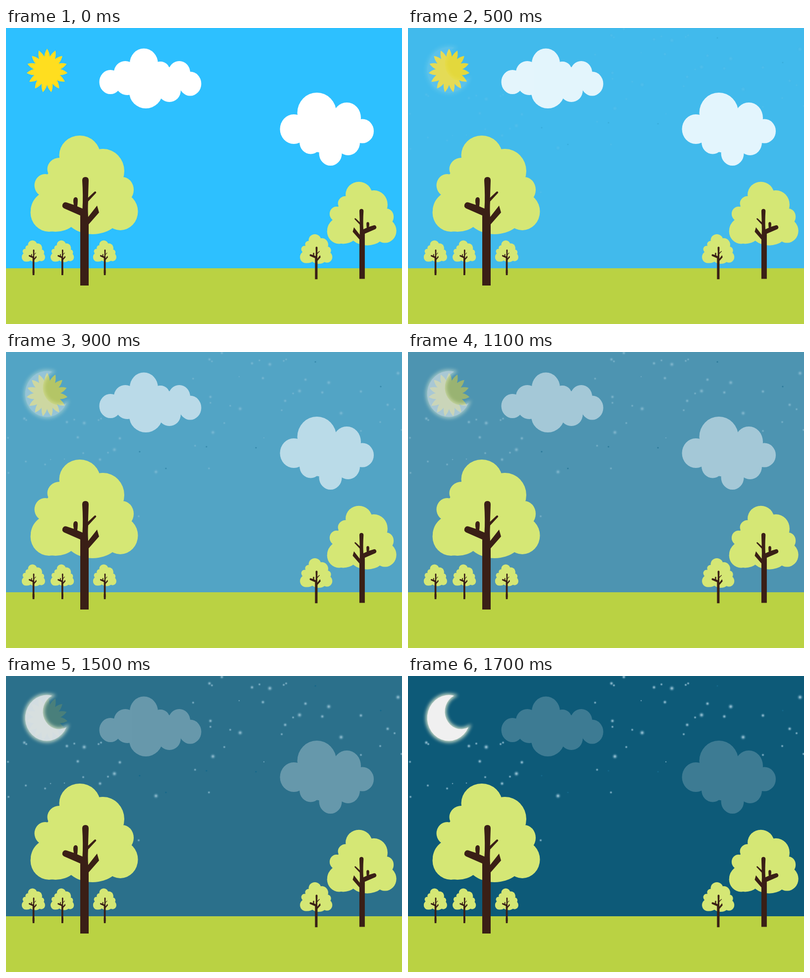
Animation of 800 by 600 pixels, one loop 2200 ms. Source, as an HTML page:

```html
<!DOCTYPE html>
<html lang="en">
<head>
<meta charset="utf-8">
<title>Day to night</title>
<style>
  html, body { margin: 0; width: 100%; height: 100%; overflow: hidden; background: #fff; }
  svg { display: block; width: 100vw; height: 100vh; }
  .day { animation: day 2200ms infinite; }
  .night { animation: night 2200ms infinite; }
  /* hold, then a crossfade in 14 steps of 100 ms, then hold */
  @keyframes day {
    0% { opacity: 1; }
    18.181% { opacity: 1; animation-timing-function: steps(14, jump-start); }
    81.815%, 100% { opacity: 0; }
  }
  @keyframes night {
    0% { opacity: 0; }
    18.181% { opacity: 0; animation-timing-function: steps(14, jump-start); }
    81.815%, 100% { opacity: 1; }
  }
</style>
</head>
<body>
<svg viewBox="0 0 800 600">
  <defs>
    <radialGradient id="glint">
      <stop offset="0" stop-color="#c4e2ee" stop-opacity=".8"/>
      <stop offset=".3" stop-color="#b4d8e8" stop-opacity=".6"/>
      <stop offset=".65" stop-color="#8cbfd6" stop-opacity=".2"/>
      <stop offset="1" stop-color="#8cbfd6" stop-opacity="0"/>
    </radialGradient>
    <filter id="blur" x="-40%" y="-40%" width="180%" height="180%">
      <feGaussianBlur stdDeviation="3.5"/>
    </filter>
    <path id="moon" d="M93 40A33 35.5 0 0 0 122 104A43.5 46.5 0 1 1 93 40Z"/>
    <g id="clouds">
      <ellipse cx="211" cy="109.5" rx="22.5" ry="24.5"/>
      <ellipse cx="241" cy="90" rx="23" ry="23"/>
      <ellipse cx="245" cy="112" rx="24" ry="24"/>
      <ellipse cx="278.5" cy="72" rx="28.5" ry="30.5"/>
      <ellipse cx="312" cy="87" rx="19" ry="19"/>
      <ellipse cx="350" cy="90" rx="22" ry="23"/>
      <ellipse cx="372" cy="113" rx="22.5" ry="24.5"/>
      <ellipse cx="330" cy="127" rx="23" ry="23"/>
      <ellipse cx="282.5" cy="130" rx="33.5" ry="33"/>
      <ellipse cx="290" cy="103" rx="75" ry="28"/>
      <ellipse cx="581.5" cy="205" rx="28" ry="30"/>
      <ellipse cx="628" cy="172" rx="39.5" ry="41"/>
      <ellipse cx="688.5" cy="182" rx="28.5" ry="31"/>
      <ellipse cx="720" cy="209" rx="23" ry="24.5"/>
      <ellipse cx="691" cy="232" rx="24" ry="26"/>
      <ellipse cx="655.5" cy="254.5" rx="23" ry="24.5"/>
      <ellipse cx="615.5" cy="231.5" rx="22.5" ry="24"/>
      <ellipse cx="650" cy="212" rx="65" ry="42"/>
    </g>
    <g id="crown" fill="#d5e775">
      <ellipse cx="149" cy="258" rx="41.5" ry="40"/>
      <ellipse cx="196" cy="290" rx="43" ry="45"/>
      <ellipse cx="108" cy="286" rx="24.5" ry="23"/>
      <ellipse cx="79" cy="319" rx="21.5" ry="23"/>
      <ellipse cx="235" cy="328" rx="23" ry="26"/>
      <ellipse cx="231" cy="372" rx="35.5" ry="38"/>
      <ellipse cx="87" cy="374" rx="37.5" ry="39"/>
      <ellipse cx="100" cy="370" rx="50" ry="43"/>
      <ellipse cx="175" cy="370" rx="60" ry="48"/>
      <ellipse cx="155" cy="335" rx="85" ry="70"/>
    </g>
    <path id="trunk" fill="#3a1f16" d="M150 522V380L117 365.5Q112 362 114.5 357Q117 352 122 353.5
      L137 358.5Q134.5 347 138 344Q142 341.5 144.5 345.5Q145.5 349 144 361.5L154.5 366
      Q156 340 154 309Q154 302 160.5 302Q167 302 167 309L165.8 344L178.5 332Q182 330 182.3 334
      L166 351.5Q165 365 166 383L184 360L188 374L167 398V522Z"/>
    <g id="tree">
      <use href="#crown"/>
      <use href="#trunk"/>
    </g>
    <g id="sapling">
      <use href="#tree" transform="scale(.217 .22) translate(-50 -218)"/>
      <path fill="#3a1f16" d="M21.7 60h3.7v10.5h-3.7z"/>
    </g>
  </defs>

  <rect class="day" width="800" height="490" fill="#2dc0ff"/>
  <rect class="night" width="800" height="490" fill="#0d5a78"/>

  <g class="day">
    <use href="#clouds" fill="#fff"/>
    <path id="sun" fill="#ffde1f"/>
  </g>

  <g class="night">
    <use href="#clouds" fill="#fff" opacity=".2"/>
    <g id="stars"></g>
    <use href="#moon" fill="#ffffdc" stroke="#ffffdc" stroke-width="6" opacity=".8" filter="url(#blur)"/>
    <use href="#moon" fill="#f0f0f0"/>
  </g>

  <rect y="487" width="800" height="113" fill="#bad243"/>
  <use href="#sapling" transform="translate(32 430.5)"/>
  <use href="#sapling" transform="translate(90.3 430.5)"/>
  <use href="#sapling" transform="translate(176 430.5)"/>
  <use href="#tree"/>
  <use href="#tree" transform="translate(594.2 418) scale(.3) translate(-50 -218)"/>
  <use href="#crown" transform="translate(649 311.7) scale(.645) translate(-50 -218)"/>
  <use href="#trunk" transform="translate(719.4 312.5) scale(-.645 .645) translate(-158.5 -218)"/>
</svg>
<script>
  const RAYS = 15;

  function sunPoint(turn, r) {
    const a = turn * 2 * Math.PI / RAYS;
    return (83 + 41.5 * r * Math.sin(a)).toFixed(1) + ' ' + (86.5 - 44.5 * r * Math.cos(a)).toFixed(1);
  }

  let d = 'M' + sunPoint(-0.5, 0.65);
  for (let i = 0; i < RAYS; i++) {
    d += 'Q' + sunPoint(i - 0.33, 0.84) + ' ' + sunPoint(i, 1);
    d += 'Q' + sunPoint(i + 0.33, 0.84) + ' ' + sunPoint(i + 0.5, 0.65);
  }
  document.getElementById('sun').setAttribute('d', d + 'Z');

  const stars = document.getElementById('stars');

  function addStars(radius, fill, points) {
    for (const point of points.split(' ')) {
      const [x, y] = point.split(',');
      const dot = document.createElementNS('http://www.w3.org/2000/svg', 'circle');
      dot.setAttribute('cx', x);
      dot.setAttribute('cy', y);
      dot.setAttribute('r', radius);
      dot.setAttribute('fill', fill);
      stars.append(dot);
    }
  }

  const glint = 'url(#glint)';
  addStars(6.5, glint, '533,25 652,62 593,79 473,115 418,163 792,43 677,124 303,243 219,198 158,144');
  addStars(5, glint, '411,15 436,2 497,23 519,53 605,56 639,82 564,99 413,91 717,80 771,107 ' +
    '230,175 190,218 145,173 123,142 37,135');
  addStars(3.5, glint, '416,19 512,17 561,18 566,15 580,84 557,118 453,109 413,103 378,54 441,144 ' +
    '785,116 756,142 717,160 799,158 382,190 410,236 268,333 206,204 138,137 41,138 187,138 192,135 ' +
    '156,205 40,222 79,228 5,245 4,174');
  addStars(2, glint, '471,50 521,174 90,218 118,217');
  addStars(1.6, '#14688a', '757,70 625,20 405,192 323,236 270,202 505,194');
</script>
</body>
</html>
```
